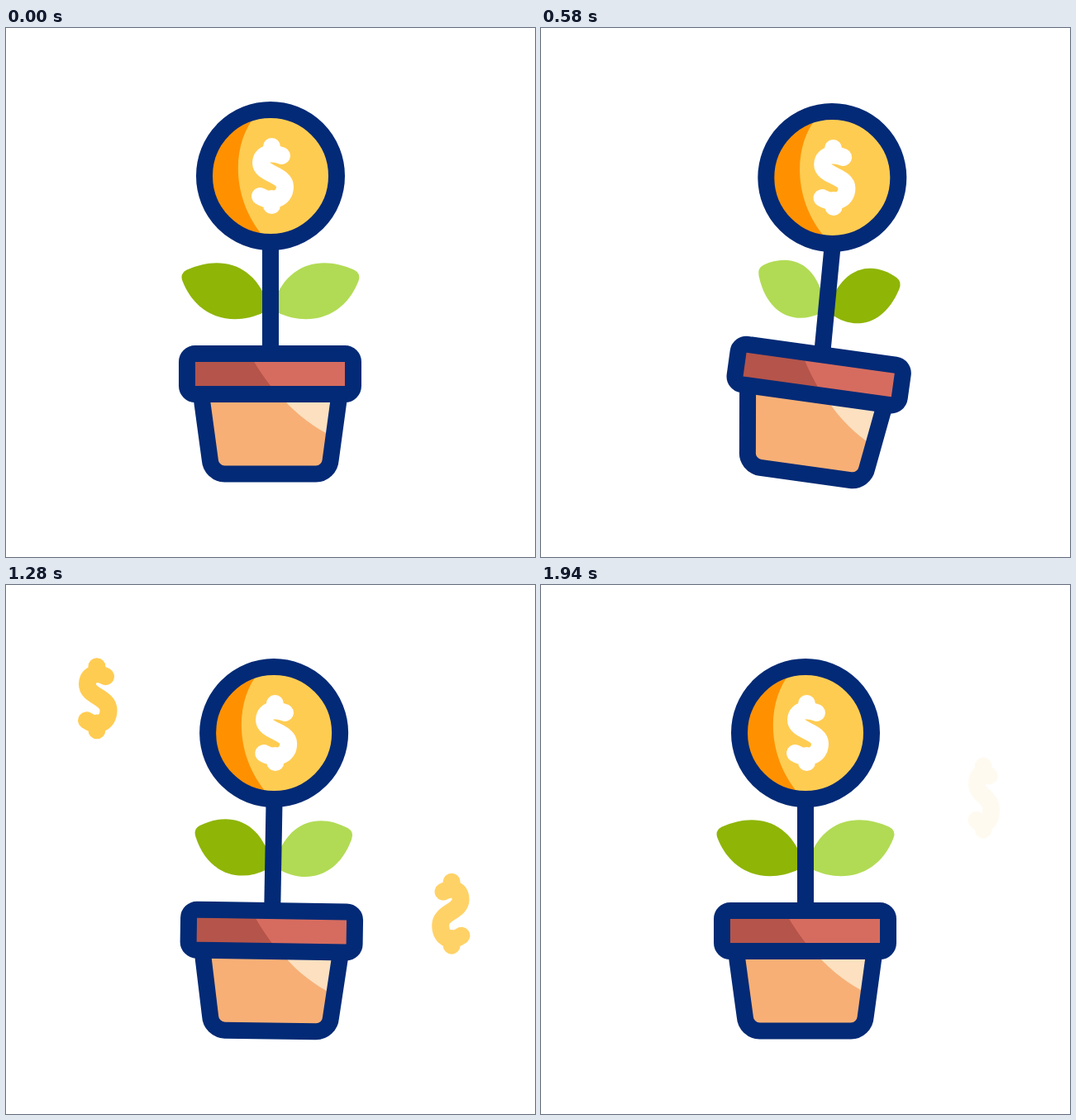
Write an HTML page that moves like this. It is 640 px wide and 640 px high and loops after 2.4 s.

```html
<!DOCTYPE html>
<html lang="en">
<head>
<meta charset="utf-8">
<title>Growing money plant</title>
<style>
  html, body { margin: 0; width: 100%; height: 100%; overflow: hidden; background: #fff; }
  svg { display: block; width: 100vw; height: 100vh; }
</style>
</head>
<body>
<svg viewBox="0 0 640 640" fill="none">
  <defs>
    <path id="dollar" vector-effect="non-scaling-stroke" stroke-width="21"
      stroke-linecap="round" stroke-linejoin="round"
      d="M11.5 -24.5C4 -28 -13 -30 -13.5 -16C-13.5 -2 15.5 -2 15.5 13C15.5 29 -2 32 -14.5 24.5M-.5 -35.5v8M-.5 35.5v-8"/>
    <path id="leaf" d="M219 292.5C255 276 299 281 317 334C319 340 316 342 312 344C274 362 231 351 213.5 306Q210 297 219 292.5Z"/>
    <path id="body" d="M236 443L246.8 522.5A18 18 0 0 0 264.6 539.5H374.9A18 18 0 0 0 392.7 522.5L403.5 443"/>
    <rect id="rim" x="219" y="394" width="201" height="49" rx="10"/>
  </defs>

  <g id="pot">
    <g id="stem">
      <g id="leaves">
        <use href="#leaf" fill="#8fb507"/>
        <use href="#leaf" fill="#b1db54" transform="matrix(-1 0 0 1 640 0)"/>
      </g>
      <path d="M320 252V396" stroke="#032a76" stroke-width="20"/>
      <g id="coin">
        <circle cx="320" cy="179" r="80" fill="#ffcc52"/>
        <path d="M302 106C274 138 270 205 313 254A75 75 0 0 1 302 106Z" fill="#ff9100"/>
        <circle cx="320" cy="179" r="80" stroke="#032a76" stroke-width="20"/>
        <use href="#dollar" x="322" y="179" stroke="#fff"/>
      </g>
    </g>
    <g stroke="#032a76" stroke-width="20">
      <use href="#body" fill="#f7af76" stroke="none"/>
      <path d="M328 440C345 462 365 478 388 490.5L394 440Z" fill="#fce0bf" stroke="none"/>
      <use href="#body"/>
      <use href="#rim" fill="#d66c5f" stroke="none"/>
      <path d="M225 400H298Q308 418 324 438H225Z" fill="#b5544a" stroke="none"/>
      <use href="#rim"/>
    </g>
  </g>

  <use id="left" href="#dollar" stroke="#ffcc52"/>
  <use id="right" href="#dollar" stroke="#ffcc52"/>
</svg>
<script>
const LOOP = 2400, REST = 1940, BEAT = 1000 / 3;
const el = id => document.getElementById(id);
const clamp = x => Math.min(1, Math.max(0, x));
const smooth = x => x * x * (3 - 2 * x);
const smoother = x => x * x * x * (10 - 15 * x + 6 * x * x);
const turnEase = x => (smooth(x) + 2 * smoother(x)) / 3;

// Eases through equally spaced values, holding the first and the last.
function track(t, start, step, values, ease) {
  const last = values.length - 1;
  const pos = Math.min(last, Math.max(0, (t - start) / step));
  const i = Math.min(last - 1, Math.floor(pos));
  return values[i] + (values[i + 1] - values[i]) * ease(pos - i);
}

// Each joint follows the one below it with a small delay.
const joints = [
  { id: "pot", y: 540, delay: 0, angles: [0, -15.6, 12.5, -5.2, 1.3, 0] },
  { id: "stem", y: 394, delay: 62, angles: [0, -25, 13.6, -6.2, 2.5, 0] },
  { id: "coin", y: 259, delay: 105, angles: [0, -18, 12.8, -4.9, 1.7, 0] }
];

const floaters = [
  { id: "left", start: 800, x: 112.4, y: 244.5, speed: 0.223 },
  { id: "right", start: 1150, x: 536.8, y: 425.5, speed: 0.2125 }
];

function draw(t) {
  for (const { id, y, delay, angles } of joints) {
    const angle = track(t, delay, BEAT, angles, smooth);
    el(id).setAttribute("transform", `rotate(${angle} 320 ${y})`);
  }

  const turn = track(t, 67, 2 * BEAT, [1, -1, 1], turnEase);
  el("leaves").setAttribute("transform", `matrix(${turn} 0 0 1 ${320 - 320 * turn} 0)`);

  for (const { id, start, x, y, speed } of floaters) {
    const age = t - start;
    const spin = -Math.cos(Math.PI * age / 600);
    const flip = Math.abs(spin) < 0.001 ? 0.001 : spin;
    el(id).setAttribute("opacity", Math.min(clamp(age / 150), clamp((798 - age) / 100)));
    el(id).setAttribute("transform",
      `translate(${x - 2.5 * flip} ${y - speed * age}) scale(${1.085 * flip} 1.085)`);
  }
}

const begin = performance.now();
function tick() {
  draw(Math.min(REST, (performance.now() - begin) % LOOP));
  requestAnimationFrame(tick);
}
tick();
</script>
</body>
</html>
```
